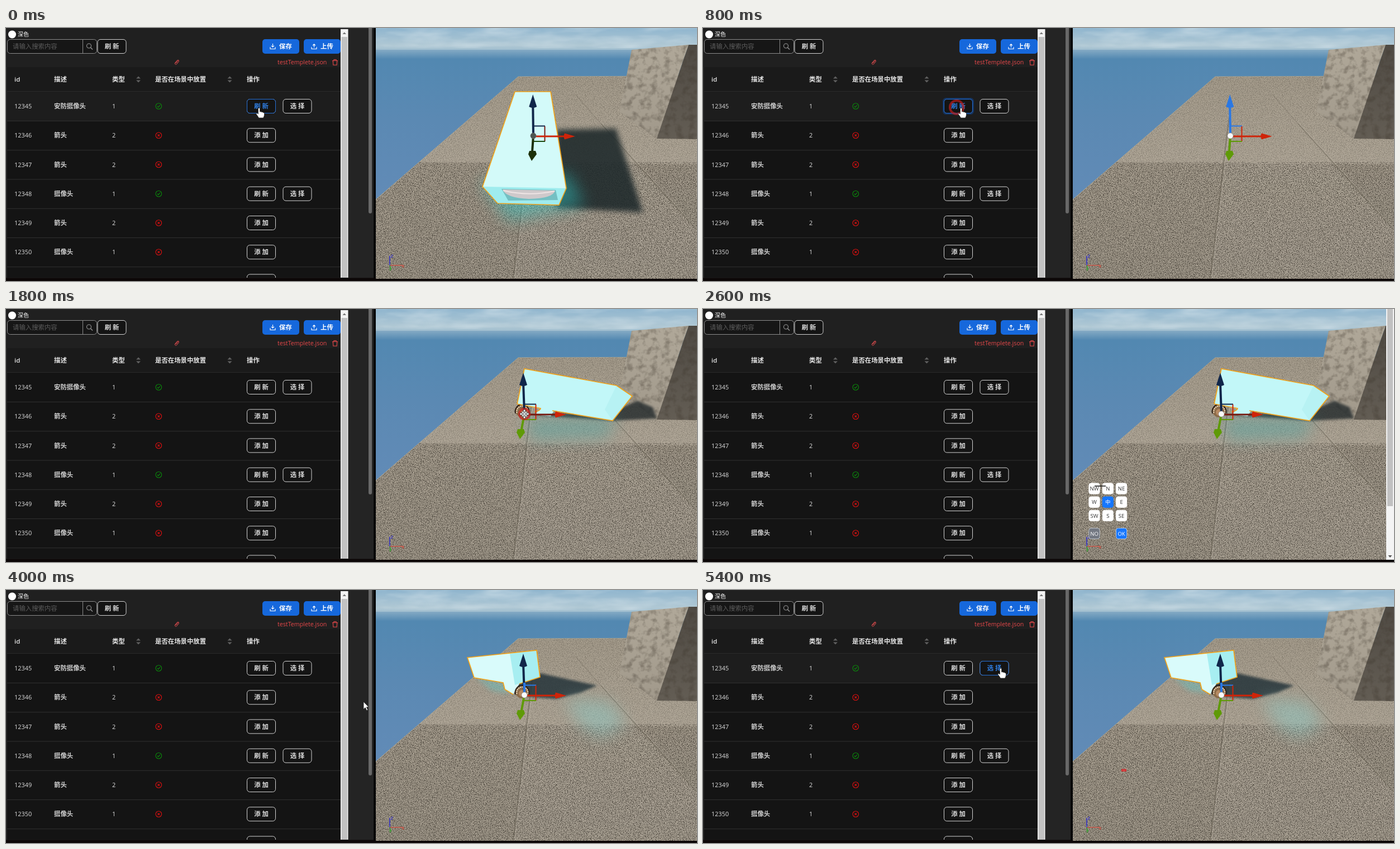
An HTML page that plays this animation: 1237x453 px, repeating every 5600 ms.

```html
<!DOCTYPE html>
<html lang="zh">
<head>
<meta charset="utf-8">
<style>
html, body { margin: 0; width: 100%; height: 100%; overflow: hidden; background: #0c0707; }
svg { display: block; }
text { font-family: "Open Sans", "Noto Sans CJK SC", "Noto Sans CJK", sans-serif; }
filter { color-interpolation-filters: sRGB; }
</style>
</head>
<body>
<svg id="stage" width="1237" height="453" viewBox="0 0 1237 453">
  <defs>
    <linearGradient id="sea" x1="0" y1="0" x2="0" y2="1">
      <stop offset="0" stop-color="#84aac4"/><stop offset=".06" stop-color="#5288b1"/>
      <stop offset=".45" stop-color="#5b89b3"/><stop offset="1" stop-color="#628bb7"/>
    </linearGradient>
    <linearGradient id="sky" x1="0" y1="0" x2="0" y2="1">
      <stop offset="0" stop-color="#8fb5ce"/><stop offset=".75" stop-color="#b0c8d4"/>
      <stop offset="1" stop-color="#9abacd"/>
    </linearGradient>
    <linearGradient id="ground" x1="0" y1="0" x2="0" y2="1">
      <stop offset="0" stop-color="#a59c8c"/><stop offset=".42" stop-color="#b0a798"/>
      <stop offset="1" stop-color="#aaa294"/>
    </linearGradient>
    <linearGradient id="wall" x1="0" y1="0" x2="0" y2="1">
      <stop offset="0" stop-color="#b0a899"/><stop offset="1" stop-color="#a1998b"/>
    </linearGradient>
    <linearGradient id="dark" x1="0" y1="0" x2="0" y2="1">
      <stop offset="0" stop-color="#4f4a43"/><stop offset="1" stop-color="#635d54"/>
    </linearGradient>
    <filter id="grain" x="0" y="0" width="1" height="1">
      <feTurbulence type="fractalNoise" baseFrequency=".7" numOctaves="2" seed="4"/>
      <feColorMatrix values="0 0 0 0 .2  0 0 0 0 .18  0 0 0 0 .15  4 0 0 0 -1.8"/>
    </filter>
    <filter id="blotch" x="0" y="0" width="1" height="1">
      <feTurbulence type="fractalNoise" baseFrequency=".09" numOctaves="3" seed="2"/>
      <feColorMatrix values="0 0 0 0 .25  0 0 0 0 .22  0 0 0 0 .18  3 0 0 0 -1.35"/>
    </filter>
    <filter id="cloud" x="0" y="0" width="1" height="1">
      <feTurbulence type="fractalNoise" baseFrequency=".014 .06" numOctaves="3" seed="9"/>
      <feColorMatrix values="0 0 0 0 .82  0 0 0 0 .88  0 0 0 0 .91  2 0 0 0 -.7"/>
    </filter>
    <filter id="crisp" x="-20%" y="-20%" width="140%" height="140%"><feGaussianBlur stdDeviation="2"/></filter>
    <filter id="soft" x="-40%" y="-40%" width="180%" height="180%"><feGaussianBlur stdDeviation="5"/></filter>
    <filter id="wide" x="-60%" y="-60%" width="220%" height="220%"><feGaussianBlur stdDeviation="14"/></filter>
    <clipPath id="view"><rect x="662" width="575" height="449"/></clipPath>
    <clipPath id="land"><path d="M917 87L1237 86V449H662V307Z"/></clipPath>
    <clipPath id="block"><path d="M1120 39L1222 30H1237V199L1165 198L1098 150Z"/></clipPath>
    <clipPath id="table"><rect width="600" height="447"/></clipPath>
  </defs>
  <g id="ui"></g>
  <g id="scene" clip-path="url(#view)"></g>
  <g id="live"></g>
</svg>
<script>
const LOOP = 5600, STEP = 200;
const el = id => document.getElementById(id);

const rect = (x, y, w, h, fill, r = 0, more = '') =>
  `<rect x="${x}" y="${y}" width="${w}" height="${h}" fill="${fill}" rx="${r}" ${more}/>`;
const line = (d, color, w = 1, more = '') =>
  `<path d="${d}" fill="none" stroke="${color}" stroke-width="${w}" ${more}/>`;
const shape = (d, fill, more = '') => `<path d="${d}" fill="${fill}" ${more}/>`;
const circle = (x, y, r, fill, more = '') =>
  `<circle cx="${x}" cy="${y}" r="${r}" fill="${fill}" ${more}/>`;
const label = (s, x, y, color, size = 11.4, weight = 400, anchor = 'start') =>
  `<text x="${x}" y="${y + size * .37}" fill="${color}" font-size="${size}" font-weight="${weight}" text-anchor="${anchor}">${s}</text>`;
const at = (x, y, s) => `<g transform="translate(${x} ${y})">${s}</g>`;

function button(s, x, y, color = '#dcdcdc', border = '#d4d4d4') {
  return rect(x + .5, y - 12.5, 51, 25, '#141414', 5, `stroke="${border}"`) +
    label(s, x + 26, y, color, 11.4, 600, 'middle');
}

function blueButton(s, x, up) {
  const tip = up ? 'M0 2V-4M-2.5 -1.7L0 -4.3L2.5 -1.7' : 'M0 -5V1M-2.5 -1.3L0 1.3L2.5 -1.3';
  return rect(x, 20, 66, 26, '#1668dc', 5) +
    at(x + 18.5, 33, line(tip + 'M-4.5 1V4.5H4.5V1', '#fff', 1.1)) +
    label(s, x + 30, 33, '#fff', 11.4, 600);
}

function status(y, ok) {
  const c = ok ? '#0b8a0b' : '#e01010';
  return at(273.3, y, circle(0, 0, 5.3, 'none', `stroke="${c}" stroke-width="1.1"`) +
    line(ok ? 'M-2.4 0L-.6 1.9L2.5 -1.8' : 'M-1.9 -1.9L1.9 1.9M1.9 -1.9L-1.9 1.9', c, 1.1));
}

const rowY = i => 140 + i * 52.25;

function drawUi() {
  let s = rect(0, 0, 662, 449, '#242424') + rect(0, 0, 599, 70, '#202020') +
    rect(2, 70, 597, 44, '#1a1a1a') + rect(2, 114, 597, 333, '#141414') +
    rect(2, 114, 597, 52, '#1d1d1d', 0, 'id="hover"');
  s += circle(11, 11.5, 7, '#fff') + label('深色', 21, 11.5, '#fff', 10, 500);
  s += rect(2.5, 20.5, 160, 25, '#161616', 5, 'stroke="#8c8c8c"') + line('M137.5 20V46', '#8c8c8c') +
    label('请输入搜索内容', 12, 33, '#5c5c5c') +
    circle(148.5, 32, 4, 'none', 'stroke="#999" stroke-width="1.1"') + line('M151.5 35L155 38.5', '#999', 1.2);
  s += button('刷 新', 163.5, 33) + blueButton('保存', 459, false) + blueButton('上传', 533, true);
  s += at(306, 61.5, line('M-3 1.5L1 -2.8Q3 -3.8 3.4 -1.4L-.7 3.4Q-3.4 4.6 -3.8 1.6L.2 -3.4Q2.6 -5.4 4 -2.8M-1.4 1.6L1.6 -1.6', '#d84a4c', 1)) +
    label('testTemplete.json', 486, 61.5, '#e8484a', 10.7) +
    at(589, 61.5, line('M-5 -3H5M-2 -3V-5H2V-3M-3.7 -3L-3.2 4.7H3.2L3.7 -3', '#e8484a', 1.1));

  [['id', 15], ['描述', 86], ['类型', 190], ['是否在场景中放置', 267], ['操作', 431]]
    .forEach(([t, x]) => s += label(t, x, 92, '#e6e6e6', 11.4, 600));
  [237, 400.5].forEach(x => s += at(x, 92, shape('M-4 -1.5L0 -5.5L4 -1.5ZM-4 1.5L0 5.5L4 1.5Z', '#616161')));
  s += line('M2 113.5H599', '#2b2b2b');

  const kinds = ['安防摄像头', '箭头', '箭头', '摄像头', '箭头', '摄像头'];
  kinds.forEach((kind, i) => {
    const y = rowY(i), placed = i === 0 || i === 3;
    s += label(12345 + i, 15, y, '#dedede', 10.9, 500) + label(kind, 86, y, '#d2d2d2', 11.4, 600) +
      label(kind === '箭头' ? 2 : 1, 190, y, '#dedede', 10.9, 500) + status(y, placed);
    s += placed ? button('刷 新', 431, y) + button('选 择', 495.5, y) : button('添 加', 431, y);
    s += line(`M2 ${y + 26.5}H599`, '#303030');
  });
  s += `<g clip-path="url(#table)">${button('', 431, rowY(6))}</g>`;

  s += rect(599, 2, 13.5, 445, '#f3f3f3') + rect(600.5, 16, 10.5, 431, '#c2c2c2') +
    shape('M602.5 11L605.7 7.5L609 11Z', '#777');
  s += rect(649, -6, 6, 338, '#686868', 3) + rect(658, 0, 4, 449, '#070707') + rect(0, 447.5, 662, 6, '#0c0707');
  el('ui').innerHTML = s;
}

function drawScene() {
  const land = rect(662, 86, 575, 364, 'url(#ground)') +
    shape('M742 240L1122 243L1237 362V449H662V290Z', '#6b6356', 'opacity=".12"') +
    shape('M1125 243H1237V362Z', '#5e574c', 'opacity=".15"') +
    shape('M934 240L1122 243L1237 362V449H908Z', '#bdb5a7', 'opacity=".25"') +
    rect(662, 86, 575, 154, '#000', 0, 'filter="url(#grain)" opacity=".3"') +
    rect(662, 240, 575, 210, '#000', 0, 'filter="url(#grain)" opacity=".75"') +
    line('M942 160L938 190L908 449', '#6b6457', 2, 'opacity=".6"') +
    line('M945 160L941 190L911 449', '#c2baab', 1, 'opacity=".5"') +
    line('M1020 120L1064 170', '#6b6457', 1.2, 'opacity=".3"') +
    line('M1064 170L1237 362', '#6b6457', 1.8, 'opacity=".5"') +
    line('M1066.5 170L1237 359', '#c2baab', 1, 'opacity=".5"') +
    line('M742 240.5L1122 243H1237', '#b8b0a1', 1, 'opacity=".4"') +
    line('M825 170H1064L1165 172', '#b2aa9a', 1, 'opacity=".35"');
  el('scene').innerHTML =
    rect(662, 0, 575, 42, 'url(#sky)') + rect(662, 0, 575, 36, '#fff', 0, 'filter="url(#cloud)" opacity=".6"') +
    rect(662, 39, 575, 280, 'url(#sea)') +
    `<g clip-path="url(#land)">${land}</g>` +
    line('M662 307L917 87L1237 86', '#b5aa91', 1, 'opacity=".7"') +
    shape('M1120 39L1222 30L1165 198L1098 150Z', 'url(#wall)') +
    shape('M1222 30H1237V199L1165 198Z', 'url(#dark)') +
    `<g clip-path="url(#block)">${rect(1098, 30, 139, 170, '#000', 0, 'filter="url(#blotch)" opacity=".35"')}</g>` +
    '<g id="models"></g>' +
    line('M687 408V425', '#1818e8', 1.2) + line('M687 425H710', '#d84a3c', 1.2) + line('M687 425L689 432', '#16a016', 1.2) +
    label('Z', 688.5, 408, '#1818e8', 8) + label('X', 708.5, 426, '#ee2a1c', 8) + label('Y', 685.5, 432, '#16b016', 8);
}

const EDGE = 'stroke="#f0a21a" stroke-width="1.7" stroke-linejoin="round"';
const CRISP = 'filter="url(#crisp)"', SOFT = 'filter="url(#soft)"', WIDE = 'filter="url(#wide)"';

const mount = circle(924, 182, 12, '#8a6a48') +
  line('M912 187A12.5 12.5 0 1 1 936 187', '#2b2018', 2) +
  line('M914.5 186A10 10 0 1 1 934 186', '#f5e6cb', 2, 'stroke-dasharray="2 1.4"') + circle(924, 185, 6, '#b78a62');

const models = {
  none: '',
  front:
    shape('M985 182L1092 180L1140 330L985 322Z', '#1d282a', `${SOFT} opacity=".88"`) +
    shape('M850 275L1008 260L1035 318L900 345Z', '#2fc9c6', `${WIDE} opacity=".45"`) +
    shape('M911 114H975L1003 287L990 317L880 314L853 284Z', '#9fecee') +
    shape('M911 114H975L1003 287L853 284Z', '#d3faf9') +
    shape('M887 288L984 290L988 308L899 309Z', '#74bfc2') +
    shape('M889 289L983 291Q980 305 936 306Q894 304 889 289Z', '#cfc9cb') +
    line('M890 291Q936 302 982 292', '#eee4e4', 2) +
    shape('M911 114H975L1003 287L990 317L880 314L853 284Z', 'none', EDGE),
  side:
    shape('M940 190L1085 200L1165 196L1158 176L1130 164L1090 182Z', '#22292b', `${CRISP} opacity=".8"`) +
    shape('M930 195H1095L1075 230L940 235Z', '#4aa9a8', `${WIDE} opacity=".45"`) +
    mount +
    shape('M928 107L1093 137L1121 156L1086 200L981 182L975 192L946 189L957 179L915 170Z', '#c2f7f8') +
    shape('M1093 137L1121 156L1086 200L1072 180Z', '#a6e8ea', 'opacity=".4"') +
    line('M915 170L928 107L1093 137L1121 156L1086 200L978 182M915 170L957 178Q957 182 946 184', '#f0a21a', 1.7),
  corner:
    shape('M920 160L956 149L1058 171L1028 184L985 195L945 192L905 184Z', '#25343a', `${CRISP} opacity=".85"`) +
    shape('M1000 195L1080 200L1110 240L1065 265L1030 245Z', '#8fc9c4', `${WIDE} opacity=".5"`) +
    shape('M840 155L895 168L900 185L870 180Z', '#5fc5c5', `${SOFT} opacity=".45"`) +
    shape('M826 121L950 108L956 156L919 168L908 187L893 178L890 166L838 157Z', '#d9fbfb') +
    shape('M902 114L950 108L956 156L911 170Z', '#a7eef1') +
    line('M908 187L893 178L890 166L838 157L826 121L950 108L956 156L919 168', '#f0a21a', 1.7) + mount
};

function gizmo(x, y, lean, model) {
  const hid = model === 'front', blue = '#2a78e4', navy = '#10264a', red = '#cf2409';
  const up = model === 'none' ? blue : navy;
  const green = hid ? '#1c3009' : '#5f9a07';
  const frame = hid || model === 'side' ? navy : blue;
  return at(x, y,
    line('M0 -17.5H21', frame, 2) +
    line('M20.5 -17V10', hid ? '#7c1c14' : red, 2) +
    line('M0 10H21', hid ? '#1c4a10' : green, 2) +
    line(`M0 0L${lean / 4} -56`, up, 4) +
    (model === 'corner' ? line('M0 0V-22', blue, 4) : '') +
    shape(`M${lean / 4} -74L${lean / 4 + 7} -52Q${lean / 4} -48 ${lean / 4 - 7} -52Z`, up) +
    line('M0 1H58', model === 'side' ? '#741a10' : red, 3) + shape('M75 1L56 -4.5Q53 1 56 6.5Z', red) +
    line(`M0 0L${lean * .7} 30`, green, 4) +
    shape(`M${lean} 45L${lean - 6} 33L${lean - 4} 27H${lean + 7}L${lean + 9} 33Z`, green) +
    circle(0, 0, 5.2, hid ? '#4e5652' : '#fafafa', 'stroke="#777" stroke-width=".6"'));
}

function compass() {
  const keys = ['NW', 'N', 'NE', 'W', '中', 'E', 'SW', 'S', 'SE', 'NO', '', 'OK'];
  return keys.map((k, i) => {
    if (!k) return '';
    const x = 700.5 + i % 3 * 24.3, y = [321.5, 345.7, 370, 402][i / 3 | 0];
    const fill = k === '中' || k === 'OK' ? '#1677ff' : k === 'NO' ? '#737882' : '#fff';
    return rect(x - 9.7, y - 9.7, 19.4, 19.4, fill, 4, `stroke="${i > 8 ? '#d8dde4' : fill}" stroke-width=".8"`) +
      label(k, x, y, fill === '#fff' ? '#333' : '#fff', 9.5, 400, 'middle');
  }).join('');
}

const pageBar = rect(1223, 0, 14, 449, '#f4f4f4') + rect(1225, 0, 10, 353, '#c1c1c1') +
  shape('M1226.5 441L1230 445L1233.5 441Z', '#555');

const pointers = {
  hand: shape('M-1.6 1Q0 -1 1.6 1V7Q3.5 6 4.6 7.6Q6.5 6.8 7.3 8.4Q9.3 7.8 9.5 10V13Q9 15.5 7.6 18H-.5Q-2.4 14.5 -5 11.3Q-5.2 9 -3.2 9.7L-1.6 11Z',
    '#fff', 'stroke="#222" stroke-width=".8"'),
  arrow: shape('M0 0V13.5L3.2 10.6L5.6 15.8L7.8 14.8L5.4 9.7H9.4Z', '#fff', 'stroke="#222" stroke-width=".8"'),
  move: shape('M0 -9L3 -5H1V-1H5V-3L9 0L5 3V1H1V5H3L0 9L-3 5H-1V1H-5V3L-9 0L-5 -3V-1H-1V-5H-3Z',
    '#fff', 'stroke="#222" stroke-width=".8"')
};

// time, x, y, pointer kind (empty: out of sight)
const path = [
  [0, 453, 143, 'hand'], [600, 455, 142, 'hand'], [800, 462, 143, 'hand'], [1200, 470, 143, 'hand'],
  [1400, 520, 143, 'hand'], [1600, 760, 168, 'arrow'], [1800, 928, 188, 'move'], [2200, 810, 250, 'arrow'],
  [2400, 0, 0, ''], [4000, 640, 200, 'arrow'], [4200, 460, 143, 'hand'], [4400, 470, 143, 'hand'],
  [4600, 575, 163, 'arrow'], [5000, 533, 140, 'hand'], [LOOP, 533, 140, 'hand']
];

function cursor(t) {
  const i = path.findLastIndex(p => p[0] <= t), [t0, x0, y0, kind] = path[i];
  if (!kind || kind === 'move') return { x: x0, y: y0, kind };
  const [t1, x1, y1, next] = path[i + 1], k = next ? (t - t0) / (t1 - t0) : 0;
  return { x: x0 + (x1 - x0) * k, y: y0 + (y1 - y0) * k, kind };
}

const ring = (x, y, r, o) => circle(x, y, r, 'none', `stroke="#c81e1e" stroke-width="4" opacity="${o}"`);

// A button under the pointer turns blue, with a glow just after a click.
function hoverButton(s, x, p, clicked) {
  if (p.kind !== 'hand' || p.x < x || p.x > x + 52) return '';
  return (clicked ? rect(x - 2, 125, 56, 30, '#123d7a', 6, 'opacity=".7"') : '') +
    button(s, x, 140, '#2f7de0', '#2470d8');
}

function render(ms) {
  const t = Math.floor(ms % LOOP / STEP) * STEP;
  const within = (a, b) => t >= a && t < b;
  const model = t < 800 ? 'front' : within(1400, 3000) ? 'side' :
    within(3000, 4400) || t >= 5200 ? 'corner' : 'none';
  const p = cursor(t);
  el('hover').setAttribute('opacity', p.kind === 'hand' ? 1 : 0);
  el('models').innerHTML = models[model] + (t < 1400 ? gizmo(944, 193, -3, model) : gizmo(928, 188, -8, model));

  let s = hoverButton('刷 新', 431, p, within(800, 1000) || t === 4200) + hoverButton('选 择', 495.5, p, t === 1400 || t === 5200);
  if (within(2400, 3800)) s += pageBar + compass();
  if (t === 2600) s += line('M701 317H721', '#111', 1.5);
  if (t >= 4400) s += rect(749, 320.5, 9, 4.5, '#c92b2b') + line('M750.5 322.8H756.5', '#e88', .7);
  if (within(600, 1000)) s += ring(454, 142, t === 600 ? 8 : 12, .65);
  if (t === 1800) s += ring(928, 188, 9, .75);
  if (t === 4200) s += ring(460, 142, 10, .6);
  if (t === 5200) s += ring(533, 140, 12, .6);
  if (p.kind) s += at(p.x, p.y, pointers[p.kind]);
  el('live').innerHTML = s;
}

drawUi();
drawScene();
let last = -1;
function tick() {
  const now = performance.now(), step = Math.floor(now / STEP);
  if (step !== last) { last = step; render(now); }
  requestAnimationFrame(tick);
}
tick();
</script>
</body>
</html>
```
